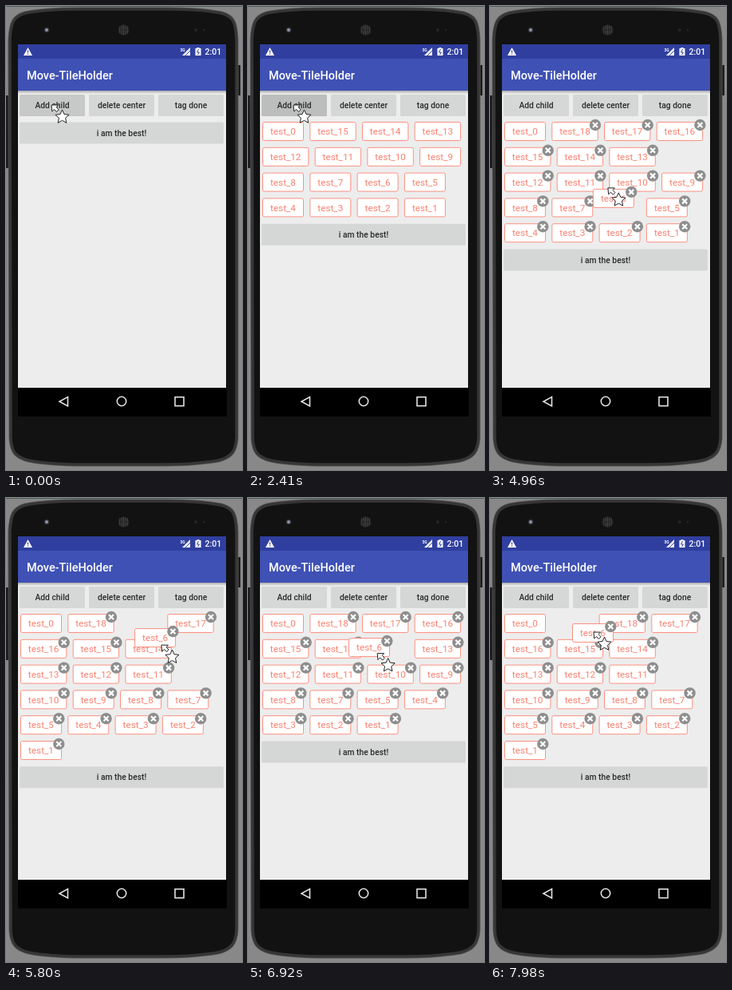
An HTML page for the animation above (8000 ms loop, 296 by 581 pixels).

```html
<!DOCTYPE html>
<html lang="en">
<head>
<meta charset="utf-8">
<title>Tag list</title>
<style>
  html, body { margin: 0; width: 100%; height: 100%; overflow: hidden; background: #888; }
  svg { display: block; }
  text { font-family: Roboto, sans-serif; }
  .btn rect { fill: #d5d7d6; }
  .btn text { font-size: 10.3px; font-weight: 500; text-anchor: middle; fill: #2a2a2a; }
  .tag rect { fill: #fff; stroke: #fc9080; }
  .tag text { font-size: 11.8px; text-anchor: middle; fill: #fb8170; }
  .badge circle { fill: #8e8e8e; }
  .badge path { stroke: #fff; stroke-width: 2.2; }
  .nav { fill: none; stroke: #e2e2e2; stroke-width: 1.6; }
  .white { fill: #fff; }
</style>
</head>
<body>
<svg width="296" height="581" viewBox="0 0 296 581">
  <defs>
    <pattern id="mesh" width="2.4" height="2.4" patternUnits="userSpaceOnUse">
      <circle cx="1.2" cy="1.2" r=".8" fill="#686868"/>
    </pattern>
    <linearGradient id="shade" x2="0" y2="1">
      <stop stop-color="#000" stop-opacity=".28"/>
      <stop offset="1" stop-color="#000" stop-opacity="0"/>
    </linearGradient>
    <path id="body" d="M5 42C6 20 10 13 24 9Q50 4 90 4H205Q245 4 270 9C285 13 288 20 289 42V541C288 558 282 565 266 569Q235 574 200 574H95Q55 574 29 569C12 565 7 558 6 541Z"/>
  </defs>

  <!-- phone -->
  <rect width="296" height="581" fill="#888"/>
  <rect width="296" height="1" fill="#47605a"/>
  <path d="M0 112h4v91h-4zM290 74h4v38h-4z" fill="#1b1b1b"/>
  <use href="#body" stroke="#565656" stroke-width="5"/>
  <use href="#body" fill="#121212" stroke="#363636" stroke-width="3.5"/>
  <circle cx="51" cy="30" r="3.5" fill="#2b2e33"/>
  <circle cx="51" cy="30" r="2" fill="#8d96a3"/>
  <circle cx="147.5" cy="30" r="6.8" fill="url(#mesh)"/>
  <circle cx="238" cy="30" r="2" fill="#242424"/>
  <circle cx="248" cy="30" r="1.5" fill="#222"/>

  <!-- screen -->
  <rect x="15" y="48" width="261" height="466" fill="#ededed"/>
  <rect x="15" y="48" width="261" height="18" fill="#303f9f"/>
  <rect x="15" y="66" width="261" height="40" fill="#3f51b5"/>
  <rect x="15" y="106" width="261" height="4" fill="url(#shade)"/>
  <path class="white" d="M27.5 52L33 62H22Z"/>
  <path d="M27.5 55.5v3M27.5 59.5v1.3" stroke="#303f9f" stroke-width="1.2"/>
  <path class="white" d="M231 52V62H221Z"/>
  <path d="M225 62l6-6" stroke="#303f9f"/>
  <text class="white" x="218.5" y="56.5" font-size="5" font-weight="700">3G</text>
  <path class="white" d="M239.5 52h3v1h2v9h-7v-9h2z"/>
  <path d="M241.5 54l-2 4h3l-2 3" fill="none" stroke="#303f9f"/>
  <text class="white" x="249.5" y="61" font-size="10.5" font-weight="500">2:01</text>
  <text class="white" x="26" y="92" font-size="14.5" font-weight="500">Move-TileHolder</text>
  <rect x="15" y="478" width="262" height="36" fill="#000"/>
  <path class="nav" d="M77.500 489.500V501L67 495.200Z"/>
  <circle class="nav" cx="145" cy="495" r="5.700"/>
  <rect class="nav" x="212" y="489.700" width="11" height="11"/>

  <g id="list"></g>
  <g id="pointer" stroke="#222" stroke-linejoin="round" fill="#fff">
    <path d="M0 0H8.500L6.200 2.600L9 5.800L6.500 8.500L3.500 5.300L.8 8Z"/>
    <path id="star"/>
  </g>
</svg>
<script>
const NS = 'http://www.w3.org/2000/svg';
const LOOP = 8000, LEFT = 18, RIGHT = 270, TOP = 145, ROW = 31.8, GAP = 7.3;
const LAST = 18, HELD = 6, BADGES_AT = 4230, DRAG_AT = 4780, LEAD = 80;
const list = document.getElementById('list');
const pointer = document.getElementById('pointer');

// Turning points of the held tag: time, x, y
const drag = [[4740, 137, 241], [4960, 129, 229], [5400, 88, 158], [5800, 161, 163],
  [6150, 165, 212], [6500, 90, 160], [6920, 126, 175], [7250, 155, 212],
  [7600, 90, 185], [7980, 103, 157]];

function add(parent, tag, attrs, text) {
  const el = document.createElementNS(NS, tag);
  for (const key in attrs) el.setAttribute(key, attrs[key]);
  if (text) el.textContent = text;
  return parent.appendChild(el);
}

const clamp = k => Math.min(1, Math.max(0, k));
const place = (el, x, y) => el.setAttribute('transform', `translate(${x} ${y})`);
const show = (el, on) => el.setAttribute('visibility', on ? 'visible' : 'hidden');
const widthOf = n => n > 9 ? 58.4 : 52;

function makeButton(x, y, w, label) {
  const g = add(list, 'g', { class: 'btn' });
  add(g, 'rect', { width: w, height: 27, rx: 1.5 });
  add(g, 'text', { x: w / 2, y: 17 }, label);
  place(g, x, y);
  return g;
}

function makeTag(n) {
  const w = widthOf(n);
  const g = add(list, 'g', { class: 'tag' });
  add(g, 'rect', { x: .5, y: .5, width: w - 1, height: 23, rx: 2 });
  add(g, 'text', { x: w / 2, y: 16.3 }, 'test_' + n);
  const badge = add(g, 'g', { class: 'badge' });
  add(badge, 'circle', { r: 7.2 });
  add(badge, 'path', { d: 'M-3-3L3 3M3-3L-3 3' });
  place(badge, w - 3.7, 4);
  return { g, badge };
}

const addButton = makeButton(17, 111, 82, 'Add child').firstChild;
makeButton(104, 111, 82, 'delete center');
makeButton(191, 111, 82, 'tag done');
const footer = makeButton(17, TOP, 256, 'i am the best!');

const tags = Array.from({ length: LAST + 1 }, (_, n) => makeTag(n));
list.appendChild(tags[HELD].g);

const corners = Array.from({ length: 10 }, (_, i) => {
  const r = i % 2 ? 4.3 : 9, a = Math.PI * (i / 5 - .5);
  return `${13.5 + r * Math.cos(a)} ${15 + r * Math.sin(a)}`;
});
document.getElementById('star').setAttribute('d', `M${corners.join('L')}Z`);

// Smooth curve through timed points
function spline(keys, t) {
  const end = keys.length - 1;
  t = Math.min(keys[end][0], Math.max(keys[0][0], t));
  const i = Math.max(1, keys.findIndex(key => key[0] >= t));
  const a = keys[i - 1], b = keys[i], span = b[0] - a[0], k = (t - a[0]) / span;
  const slope = (j, axis) => {
    const p = keys[Math.max(0, j - 1)], q = keys[Math.min(end, j + 1)];
    return (q[axis] - p[axis]) / (q[0] - p[0]) * span;
  };
  return [1, 2].map(axis =>
    a[axis] + (b[axis] - a[axis]) * k * k * (3 - 2 * k)
    + slope(i - 1, axis) * k * (1 - k) ** 2 - slope(i, axis) * k * k * (1 - k));
}

// Taps slow down a little as they go on.
const addTime = n => 60 + 120 * n + 2.3 * n * n;

// Place in the list under a tag dragged to x, y
function slotAt(x, y) {
  const row = Math.floor((y - TOP) / ROW + .4);
  const col = Math.round((x - LEFT) / 62);
  return Math.max(1, Math.round(row * 3.65) + col);
}

// The first tag stays in front; new ones go in right behind it.
function orderAt(t, held) {
  const order = [];
  for (let n = 0; n <= LAST && addTime(n) <= t; n++) order.splice(1, 0, n);
  if (held) {
    order.splice(order.indexOf(HELD), 1);
    order.splice(slotAt(...held), 0, HELD);
  }
  return order;
}

function pointerAt(t) {
  if (t >= DRAG_AT) {
    const [x, y] = spline(drag, t + LEAD);
    return [x + 27, y + 11];
  }
  const k = clamp((t - 3020) / 470);
  return [57 + 107 * k, 124 + 128 * k + 82 * Math.sin(Math.PI * k)];
}

function buttonColor(t) {
  const c = t < 60 ? 199 : 188 + 26 * clamp((t - 3040) / 180);
  return `rgb(${c},${c + 1},${c + 1})`;
}

function render(t) {
  const held = t >= DRAG_AT && spline(drag, t);
  const order = orderAt(t, held);
  let x = LEFT, row = 0;
  for (const n of order) {
    const w = widthOf(n);
    if (x + w > RIGHT) { x = LEFT; row++; }
    place(tags[n].g, x, TOP + row * ROW);
    x += w + GAP;
  }
  if (held) place(tags[HELD].g, ...held);
  tags.forEach(({ g, badge }, n) => {
    show(g, order.includes(n));
    show(badge, n > 0 && t >= BADGES_AT);
  });
  place(footer, 17, TOP + .5 + (order.length ? row + 1 : 0) * ROW);
  addButton.style.fill = buttonColor(t);
  place(pointer, ...pointerAt(t));
}

const start = performance.now();
function tick() {
  render((performance.now() - start) % LOOP);
  requestAnimationFrame(tick);
}
tick();
</script>
</body>
</html>
```
